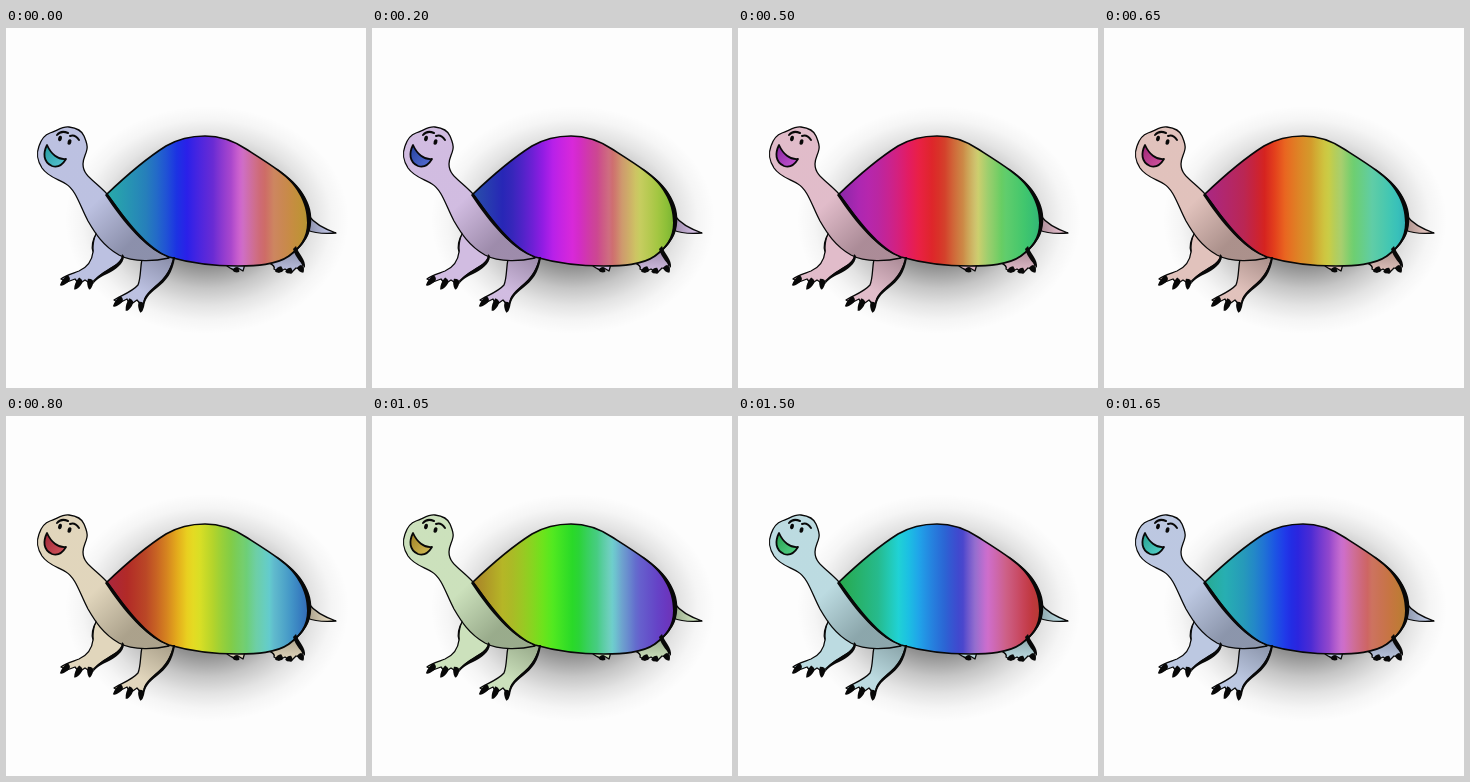
Animation, 360 px wide and 360 px high, one loop 1700 ms. Source, as an HTML page with a canvas:

```html
<!DOCTYPE html>
<html lang="en">
<head>
<meta charset="utf-8">
<title>Rainbow turtle</title>
<style>
html, body { margin: 0; width: 100%; height: 100%; overflow: hidden; background: #fdfdfd; }
canvas { display: block; width: 360px; height: 360px; }
</style>
</head>
<body>
<canvas id="stage" width="360" height="360"></canvas>
<script>
const ctx = document.getElementById('stage').getContext('2d');
const LOOP = 1700, STEP = 50;
const INK = '#080808';

const path = d => new Path2D(d);
const shell = path('M101 166C122 146 141 130 160 118C172 111 186 108 199 108C216 108 228 113 240 121C262 135 282 147 294 163C302 174 305 190 303 201C300 213 293 221 283 228C270 237 250 238 232 238C206 238 184 235 163 229C135 219 119 190 101 166Z');
const neck = path('M44 105C51 103 56 98 63 99C71 100 76 103 78 108C80 113 82 117 81 121C80 127 77 130 77 136C77 148 88 152 101 166L163 230C150 233 128 235 113 227C97 218 89 205 82 193C74 178 70 162 60 156C52 151 42 149 36 140C31 132 30 126 33 118C35 112 38 107 44 105Z');
const tail = path('M303 188C308 195 316 200 330 205C318 206 308 205 301 202Z');
const frontLeg = path('M91 204C87 211 85 218 87 224C86 233 82 239 73 243C65 246 58 248 55 251L61 254L69 251L73 256L79 252L85 256C89 250 95 246 105 240C113 236 117 232 117 226Z');
const nearLeg = path('M136 231C134 241 135 250 132 257C126 264 114 268 108 272L113 275L121 271L124 277L131 272L137 279C137 270 143 265 150 258C161 250 165 240 169 228Z');
const backLegs = path('M258 231C263 236 270 237 268 241L273 244L279 241L285 245L290 240L297 242C299 236 292 230 289 218L280 214ZM219 236C222 239 224 241 229 242L232 240L237 243L239 236Z');
const mouth = path('M41 117C37 125 37 134 46 138C52 140 57 136 60 131C52 132 45 126 41 117Z');
const thickEdges = path(
  'M101 165C120 191 141 220 166 230C140 223 117 194 99 167Z' +
  'M270 140C297 157 310 180 304 202C301 214 291 224 278 231C294 220 301 209 301 195C301 173 290 157 270 140Z' +
  'M118 228C118 236 109 242 101 246C92 250 88 254 86 258C88 249 95 246 104 240C111 236 116 232 116 226Z' +
  'M169 229C167 245 160 253 151 260C143 266 139 271 138 279C135 270 142 264 149 258C160 249 165 240 167 229Z' +
  'M290 218C293 227 300 231 299 240C296 235 290 231 287 221Z' +
  'M91 204C88 212 87 218 88 225C85 220 86 212 91 204Z');

// x, hue, saturation, lightness across the shell
const shellStops = [
  [102, 180, 62, 41], [140, 204, 66, 44], [181, 243, 82, 52], [207, 262, 66, 50],
  [225, 284, 57, 54], [237, 306, 50, 62], [250, 345, 50, 62], [268, 381, 52, 59],
  [303, 406, 56, 45]
];

const hsl = (h, s, l) => `hsl(${h % 360}, ${s}%, ${l}%)`;

function addStops(g, colors) {
  colors.forEach(([at, color]) => g.addColorStop(at, color));
  return g;
}

const gradient = (x0, y0, x1, y1, colors) =>
  addStops(ctx.createLinearGradient(x0, y0, x1, y1), colors);

function shellPaint(turn) {
  const left = shellStops[0][0], width = shellStops[shellStops.length - 1][0] - left;
  const colors = [];
  shellStops.slice(1).forEach((to, i) => {
    const from = shellStops[i];
    for (let k = 0; k <= 4; k++) {
      const [x, h, s, l] = from.map((v, j) => v + (to[j] - v) * k / 4);
      colors.push([(x - left) / width, hsl(h + turn, s, l)]);
    }
  });
  return gradient(left, 0, left + width, 0, colors);
}

function shadow() {
  const alphas = [[0, 0.7], [0.42, 0.42], [0.6, 0.22], [0.75, 0.1], [0.88, 0.03], [1, 0]];
  ctx.save();
  ctx.translate(201, 192);
  ctx.scale(142, 114);
  ctx.fillStyle = addStops(ctx.createRadialGradient(0, 0, 0, 0, 0, 1),
    alphas.map(([at, a]) => [at, `rgba(0, 0, 0, ${a})`]));
  ctx.fillRect(-1, -1, 2, 2);
  ctx.restore();
}

function shape(p, fill, width = 1.3) {
  ctx.fillStyle = fill;
  ctx.fill(p);
  ctx.lineWidth = width;
  ctx.stroke(p);
}

function claw(x, y, angle, size = 6.5) {
  ctx.save();
  ctx.translate(x, y);
  ctx.rotate(angle);
  ctx.beginPath();
  ctx.moveTo(-1.5, -size);
  ctx.quadraticCurveTo(5, -size * 0.9, 3, 0);
  ctx.quadraticCurveTo(1, size, -1.5, size);
  ctx.quadraticCurveTo(-4, 0, -1.5, -size);
  ctx.fill();
  ctx.restore();
}

function claws() {
  ctx.fillStyle = INK;
  claw(59, 253, 0.65);
  claw(72, 256, 0.4);
  claw(84, 256, -0.1, 5.5);
  claw(112, 274, 0.65);
  claw(123, 277, 0.3);
  claw(135, 279, -0.15, 5.5);
  claw(273, 242, 0.9, 4);
  claw(283, 243, 1, 3.5);
  claw(295, 241, -0.9, 4);
  claw(230, 242, 0.9, 3);
}

function face(turn) {
  shape(mouth, gradient(40, 120, 58, 138, [
    [0, hsl(183 + turn, 60, 40)], [1, hsl(187 + turn, 58, 58)]
  ]), 1.8);
  ctx.lineWidth = 2;
  ctx.stroke(path('M51 107Q55 102 62 105M64 108Q69 106 73 112'));
  ctx.fillStyle = INK;
  for (const [x, y] of [[54, 110.5], [63.5, 114]]) {
    ctx.beginPath();
    ctx.ellipse(x, y, 1.9, 2.8, 0.3, 0, Math.PI * 2);
    ctx.fill();
  }
}

function draw(time) {
  const turn = Math.floor((time % LOOP) / STEP) * STEP / LOOP * 360;
  const light = hsl(232 + turn, 38, 81);
  const dark = hsl(232 + turn, 16, 61);

  ctx.fillStyle = '#fdfdfd';
  ctx.fillRect(0, 0, 360, 360);
  ctx.strokeStyle = INK;
  ctx.lineJoin = ctx.lineCap = 'round';

  shadow();
  shape(tail, gradient(302, 0, 322, 0, [[0, dark], [1, light]]));
  shape(backLegs, gradient(0, 222, 0, 244, [[0, dark], [1, light]]));
  shape(frontLeg, light);
  shape(nearLeg, gradient(158, 228, 138, 264, [[0, dark], [1, light]]));
  claws();
  shape(neck, gradient(72, 158, 126, 214, [[0, light], [0.3, light], [1, dark]]));
  shape(shell, shellPaint(turn), 1.7);
  ctx.fillStyle = INK;
  ctx.fill(thickEdges);
  face(turn);
}

const start = performance.now();
function tick() {
  draw(performance.now() - start);
  requestAnimationFrame(tick);
}
tick();
</script>
</body>
</html>
```
